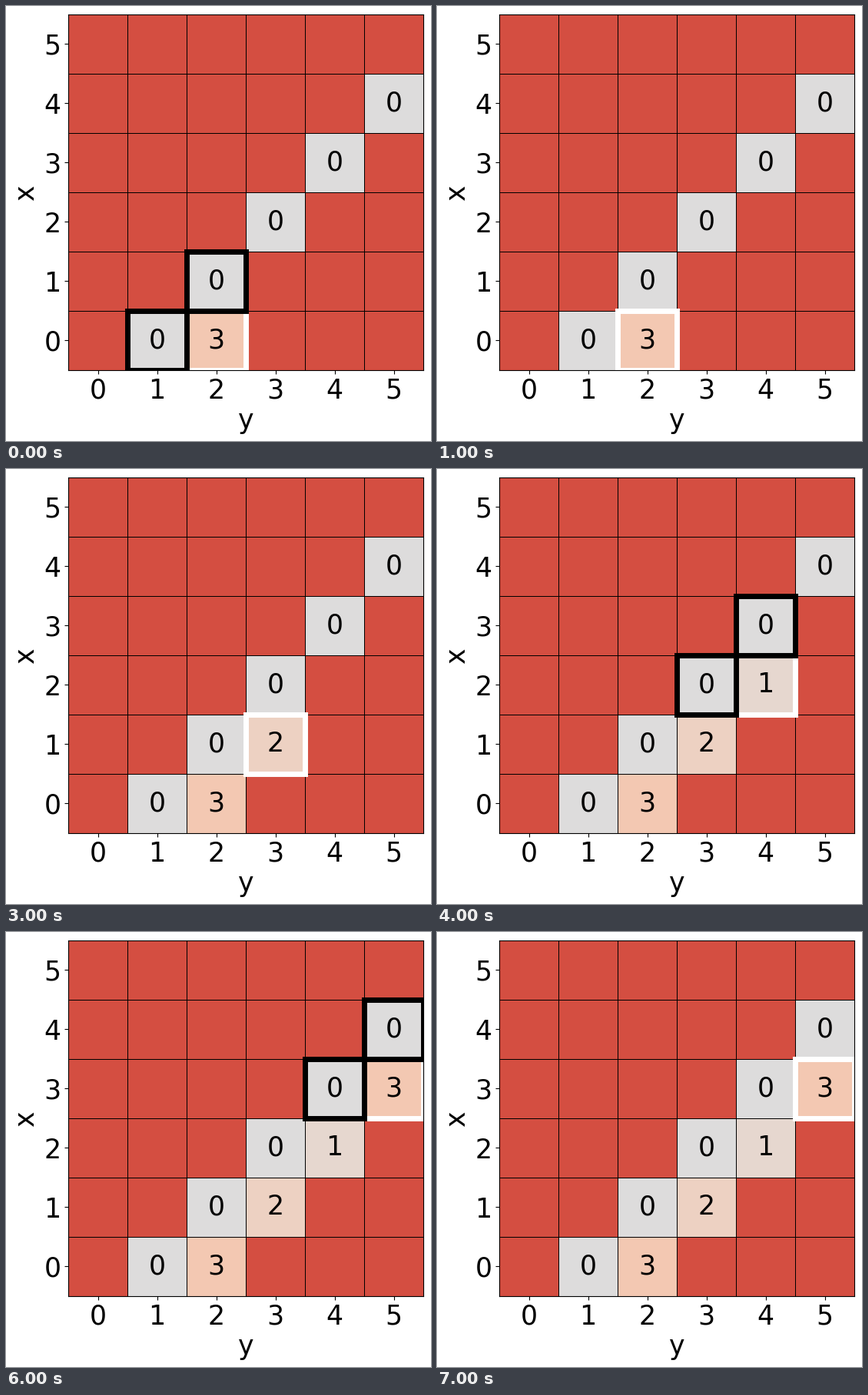
Animation of 553 by 565 pixels, one loop 8 s. Source, as a matplotlib script:

```python
import numpy as np
import matplotlib.pyplot as plt
from matplotlib.animation import FuncAnimation
from matplotlib.patches import Rectangle

W, H, DPI = 553, 565, 100
N = 6
SIZE = 77 * N
LEFT, BOTTOM = 81, 92.2
FONT = 25
STEP = 0.0365          # colormap distance per unit of value
UNSET = 0.90625        # colormap position of cells without a value
DIAGONAL = [(i, i + 1) for i in range(5)]
FILLED = [((0, 2), 3), ((1, 3), 2), ((2, 4), 1), ((3, 5), 3)]

plt.rcParams["font.family"] = "DejaVu Sans"
fig = plt.figure(figsize=(W / DPI, H / DPI), dpi=DPI, facecolor="white")
ax = fig.add_axes([LEFT / W, BOTTOM / H, SIZE / W, SIZE / H])

edges = np.arange(N + 1) - 0.5
mesh = ax.pcolormesh(edges, edges, np.full((N, N), UNSET), cmap="coolwarm",
                     vmin=0, vmax=1, edgecolors="black", linewidth=0.72)
ax.set(xlim=(-0.5, N - 0.5), ylim=(-0.5, N - 0.5),
       xticks=range(N), yticks=range(N))
ax.tick_params(labelsize=FONT)
ax.set_xlabel("y", fontsize=FONT)
ax.set_ylabel("x", fontsize=FONT)


def outline(color, zorder):
    box = Rectangle((0, 0), 1, 1, fill=False, edgecolor=color,
                    linewidth=5, zorder=zorder)
    return ax.add_patch(box)


def place(box, cell):
    row, col = cell
    box.set_xy((col - 0.5, row - 0.5))


def label(cell, value):
    row, col = cell
    return ax.text(col, row, str(value), fontsize=FONT,
                   ha="center", va="center", zorder=3)


current = outline("white", 1.5)
parents = [outline("black", 1.6) for _ in range(2)]
for cell in DIAGONAL:
    label(cell, 0)
labels = [label(cell, value) for cell, value in FILLED]


def update(frame):
    # Even steps show the two source cells, odd steps only the result.
    step, done = divmod(frame, 2)
    grid = np.full((N, N), UNSET)
    for cell in DIAGONAL:
        grid[cell] = 0.5
    for i, (cell, value) in enumerate(FILLED):
        labels[i].set_visible(i <= step)
        if i <= step:
            grid[cell] = 0.5 + STEP * value
    mesh.set_array(grid)

    place(current, FILLED[step][0])
    for box, cell in zip(parents, DIAGONAL[step:step + 2]):
        place(box, cell)
        box.set_visible(not done)
    return [mesh, current, *parents, *labels]


anim = FuncAnimation(fig, update, frames=8, interval=1000,
                     repeat=True, repeat_delay=0, blit=False)
plt.show()
```
